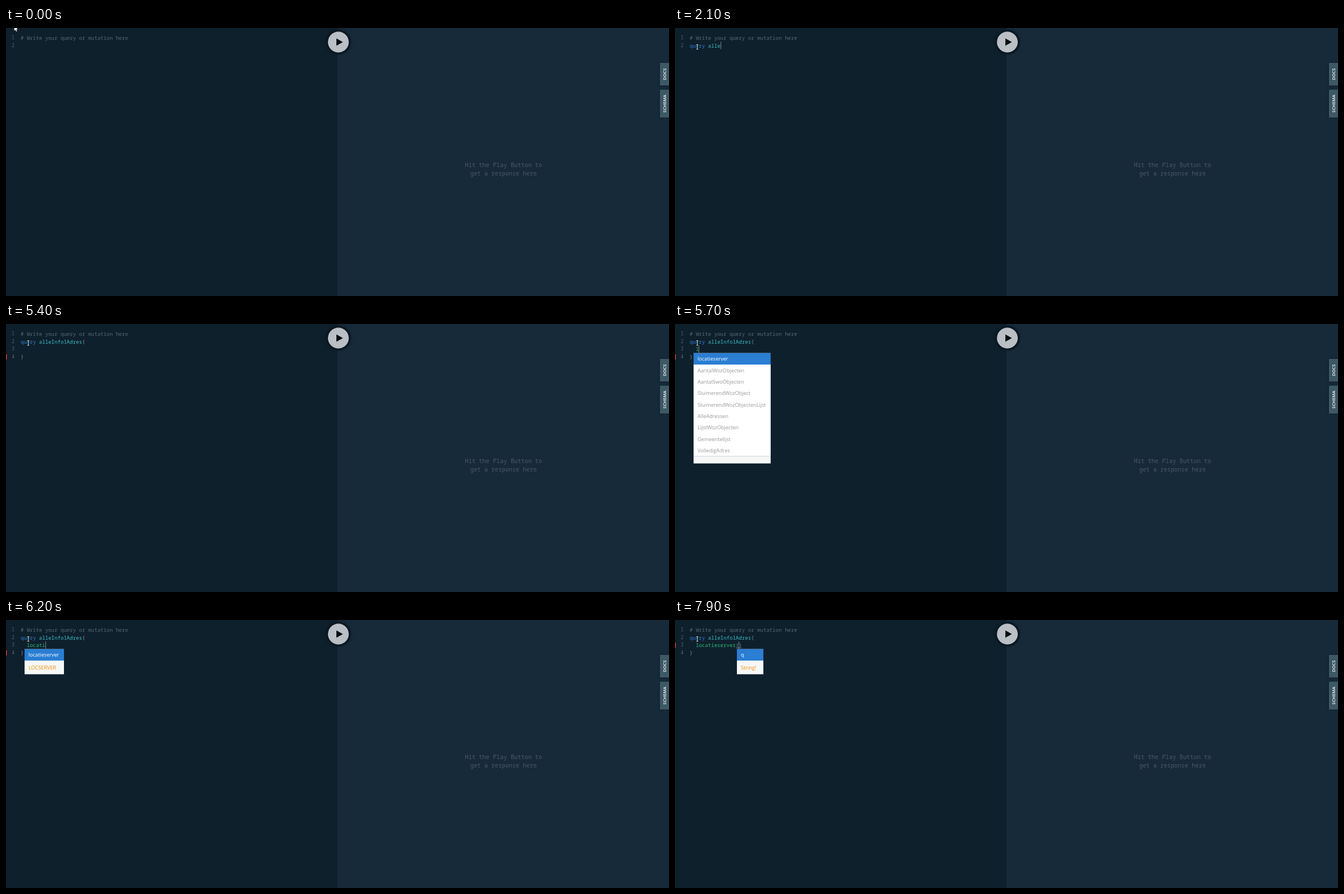
Animation, 1178 px wide and 476 px high, one loop 8000 ms. Source, as an HTML page with a canvas:

```html
<!DOCTYPE html>
<html lang="en">
<head>
<meta charset="utf-8">
<title>Query editor</title>
<style>
html, body { margin: 0; width: 100%; height: 100%; overflow: hidden; background: #0f202d; }
canvas { display: block; width: 1178px; height: 476px; }
</style>
</head>
<body>
<canvas id="stage" width="1178" height="476"></canvas>
<script>
const c = document.getElementById('stage').getContext('2d');
const LOOP = 8000, CHAR = 5.46, LEFT = 26, ROW = 13.5;
const MONO = '"Noto Sans Mono", "DejaVu Sans Mono", monospace';
const SANS = '"Open Sans", "Noto Sans", sans-serif';
const GREY = '#596770', PUNCT = '#7d8991', BLUE = '#2a7ed3', ORANGE = '#f18f01', RED = '#f33b3b';

// One time per typed character
const queryLine = 'query alleInfo1Adres{';
const queryKeys = [1000, 1300, 1400, 1500, 1600, 1700, 1800, 2000, 2000, 2100, 2400,
  2600, 2700, 2900, 3100, 3400, 3600, 3800, 4000, 4200, 4700];
const fieldLine = 'locatieserver()';
const fieldKeys = [5700, 5800, 5900, 6000, 6100, 6200, 6400, 6700,
  6900, 6900, 6900, 6900, 6900, 7700, 7700];

const fields = ['locatieserver', 'AantalWozObjecten', 'AantalSwoObjecten', 'SluimerendWozObject'];
const allFields = [...fields, 'SluimerendWozObjectenLijst', 'AlleAdressen', 'LijstWozObjecten',
  'Gemeentelijst', 'VolledigAdres'];

// from, to, x, y, width, items, type shown in the footer
const popups = [
  [1100, 1700, 22, 38, 39, ['query', '{'], ''],
  [5700, 5800, 33, 51.7, 137, allFields, ''],
  [5800, 6000, 33, 51.7, 110, fields, 'LOCSERVER'],
  [6000, 6900, 33, 51.7, 70, fields.slice(0, 1), 'LOCSERVER'],
  [7900, 8000, 110, 51.7, 47, ['q'], 'String!']
];

const count = (keys, t) => keys.filter(k => k <= t).length;
const within = (t, a, b) => t >= a && t < b;

function rect(x, y, w, h, color) {
  c.fillStyle = color;
  c.fillRect(x, y, w, h);
}

function text(s, x, y, color, font, align = 'left') {
  c.font = font;
  c.fillStyle = color;
  c.textAlign = align;
  c.fillText(s, x, y);
}

function code(s, col, row, color) {
  text(s, LEFT + col * CHAR, 21 + row * ROW, color, '9.1px ' + MONO);
}

function shape(points, fill, stroke) {
  c.beginPath();
  points.forEach(([x, y]) => c.lineTo(x, y));
  c.closePath();
  if (stroke) {
    c.strokeStyle = stroke;
    c.lineWidth = 1;
    c.stroke();
  }
  c.fillStyle = fill;
  c.fill();
}

function tab(label, y, h) {
  c.save();
  c.shadowColor = 'rgba(0,0,0,.3)';
  c.shadowBlur = 4;
  rect(1162, y, 16, h, '#3d5866');
  c.restore();
  c.save();
  c.translate(1173.2, y + h / 2);
  c.rotate(-Math.PI / 2);
  text(label, 0, 0, '#fff', '600 7.8px ' + SANS, 'center');
  c.restore();
}

function playButton() {
  c.save();
  c.shadowColor = 'rgba(0,0,0,.3)';
  c.shadowBlur = 4;
  disc(22.3, '#0b1924');
  c.restore();
  disc(18.5, '#b9bfc4');
  shape([[587, 18.5], [598.5, 25], [587, 31.5]], '#05090d');
}

function disc(r, color) {
  c.beginPath();
  c.arc(590.5, 25, r, 0, Math.PI * 2);
  c.fillStyle = color;
  c.fill();
}

function popup(x, y, w, items, type) {
  const step = 20.35, font = '9.1px ' + SANS;
  const end = y + items.length * step, foot = type ? 24.3 : 12.8;
  rect(x, y, w, end - y, '#fff');
  rect(x, y, w, step, BLUE);
  items.forEach((s, i) => text(s, x + 7, y + i * step + 13.6, i ? '#999' : '#fff', font));
  rect(x, end, w, foot, '#f6f7f7');
  if (items.length > 1) rect(x, end, w, 0.7, '#dedfe0');
  text(type, x + 7, end + 16, ORANGE, font);
}

function caret(col, row) {
  rect(Math.round(LEFT + col * CHAR), 24.5 + (row - 1) * 13.6, 0.7, 13, '#a9b2b8');
}

function editor(t) {
  const rows = t < 4900 ? 2 : 4;
  for (let i = 0; i < rows; i++) {
    text(i + 1, 15, 20 + i * ROW, GREY, '8px ' + MONO, 'right');
  }
  code('# Write your query or mutation here', 0, 0, GREY);

  const n = count(queryKeys, t), m = count(fieldKeys, t);
  const line = queryLine.slice(0, n);
  code(line.slice(0, 5), 0, 1, n < 5 ? '#a91d22' : BLUE);
  code(line.slice(6, 20), 6, 1, '#38bdc1');
  code(line.slice(20), 20, 1, PUNCT);
  if (t >= 4700) code('}', t < 4900 ? 21 : 0, t < 4900 ? 1 : 3, PUNCT);

  code(fieldLine.slice(0, Math.min(m, 13)), 2, 2, '#29b973');
  if (m > 13) {
    code('()', 15, 2, PUNCT);
    rect(LEFT + 15 * CHAR, 49, 2 * CHAR, 0.7, PUNCT);
  }

  if (within(t, 1000, 4900)) caret(n, 1);
  if (within(t, 4900, 5400) || within(t, 5700, 7400)) caret(2 + m, 2);
  if (t >= 7700) caret(16, 2);

  // Syntax error marker in the gutter
  if (t >= 4700) {
    const row = t < 5400 ? 1 : t < 7300 ? 3 : 2;
    rect(0, 13.5 + row * ROW, 1.3, 9, RED);
  }
}

function pointer(t) {
  const step = Math.min(5, Math.floor(t / 100));
  const x = 14 + step * 5, y = -4 + step * 7.4;
  if (step < 2) {
    const outline = [[0, 0], [0, 9], [2, 7.2], [3.6, 10.2], [5, 9.4], [3.5, 6.6], [6.5, 6.4]];
    shape(outline.map(([a, b]) => [x + 0.7 + a, y + b]), '#fff', '#000');
    return;
  }
  const bx = t < 700 ? x : 39.6, by = t < 700 ? y : 33.6;
  for (const [grow, color] of [[0.6, '#05090d'], [0, '#e8ebed']]) {
    const bar = (dx, dy, w, h) =>
      rect(bx + dx - grow, by + dy - grow, w + 2 * grow, h + 2 * grow, color);
    bar(-0.5, -4.5, 1, 9);
    bar(-2, -4.5, 4, 0.9);
    bar(-2, 3.7, 4, 0.9);
  }
}

function draw(t) {
  rect(0, 0, 589, 476, '#0f202d');
  rect(589, 0, 589, 476, '#172a3a');
  const font = '10.4px ' + MONO;
  text('Hit the Play Button to', 884, 246.5, '#4a5964', font, 'center');
  text('get a response here', 884, 261.5, '#4a5964', font, 'center');
  tab('DOCS', 62, 40);
  tab('SCHEMA', 109.5, 49.5);
  playButton();
  editor(t);
  for (const [from, to, ...spec] of popups) if (within(t, from, to)) popup(...spec);
  pointer(t);
}

const start = performance.now();
function frame() {
  draw((performance.now() - start) % LOOP);
  requestAnimationFrame(frame);
}
frame();
</script>
</body>
</html>
```
